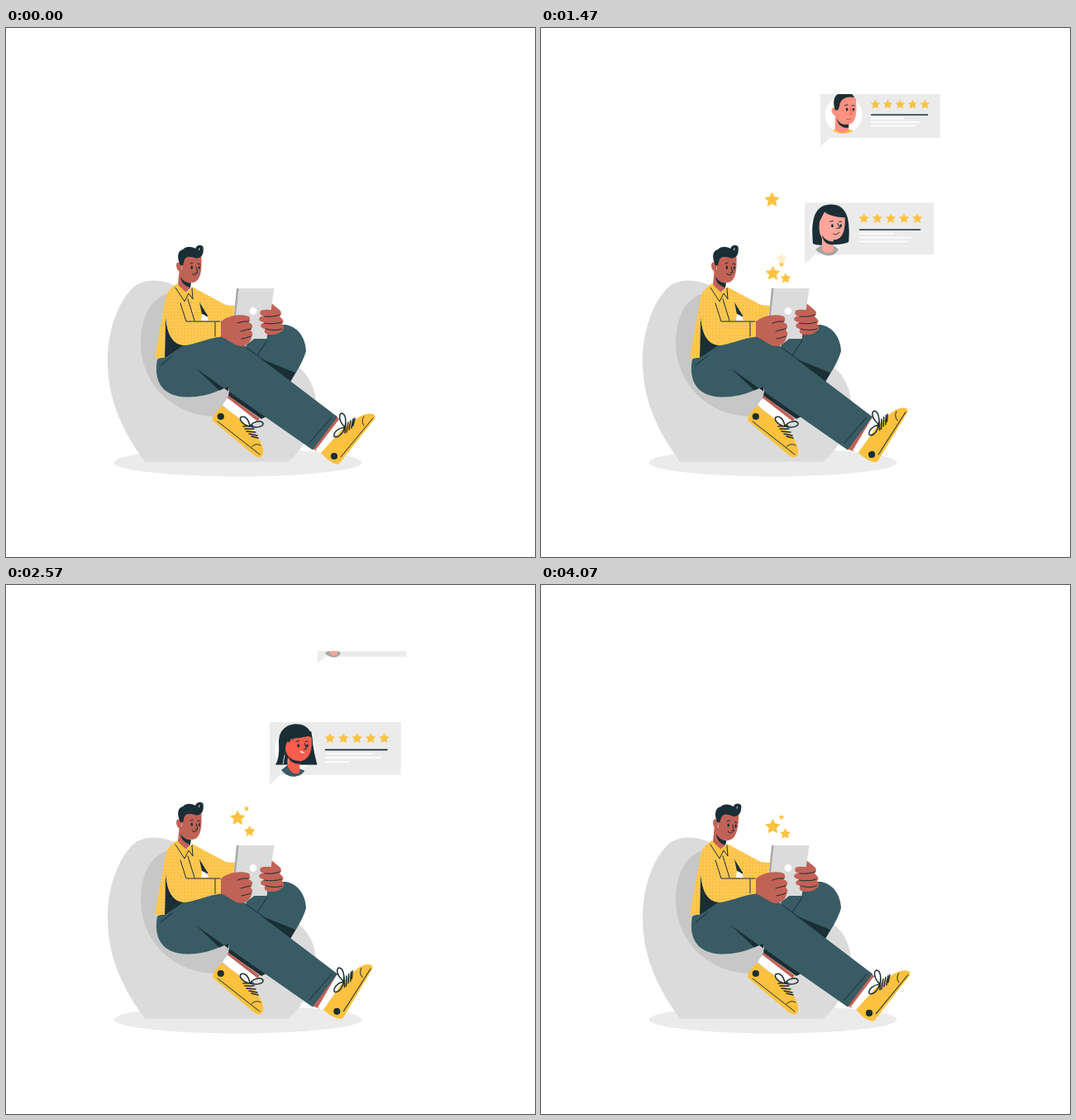
An HTML page that plays this animation: 640 px wide and 640 px high, repeating every 4130 ms.

```html
<!DOCTYPE html>
<html lang="en">
<head>
<meta charset="utf-8">
<title>Reading reviews</title>
<style>
  html, body { margin: 0; width: 100%; height: 100%; overflow: hidden; background: #fff; }
  svg { display: block; width: 100vw; height: 100vh; }
  .dark { fill: #1a2e35; }
  .teal { fill: #385b64; }
  .skin { fill: #c16256; }
  .gold { fill: #fcc13f; }
  .line { fill: none; stroke: #1a2e35; stroke-width: 1; stroke-linecap: round; stroke-linejoin: round; }
  .lace { stroke-width: 1.5; }
</style>
</head>
<body>
<svg id="stage" viewBox="0 0 640 640">
  <defs>
    <clipPath id="frame"><rect y="80" width="640" height="480"/></clipPath>
    <pattern id="check" width="4" height="4" patternUnits="userSpaceOnUse">
      <path d="M0 2H4M2 0V4" stroke="#fff" stroke-width=".6" opacity=".3"/>
    </pattern>
    <path id="farArm" d="M225 313L264 334Q268 336 277 336L275 350L258 355L243 353L224 326Z"/>
    <path id="shirt" d="M207 309C199 314 195 319 193 327L180 399L192 399L193 345C194 368 200 384 217 384C229 383 241 376 260 373.500V354.500L244 354L226 314L218 320Z"/>
  </defs>

  <ellipse cx="280.500" cy="525.700" rx="150" ry="16.800" fill="#ebebeb"/>
  <path fill="#dbdbdb" d="M168 524.700C137 482 123 445 123 402C123 362 138 327 156 312C170 303 190 304 205 312C260 340 330 382 355 411C368 422 376 440 375 458C373 490 355 514 341 524.700Z"/>
  <path fill="#c7c7c7" d="M206 319C180 322 163 342 163 382C164 432 203 470 255 470L290 440Z"/>

  <g clip-path="url(#frame)">
    <g id="cards"></g>
    <g id="stars"></g>
  </g>

  <!-- far leg -->
  <path class="teal" d="M290 384C312 366 326 358 338 359C354 361 363 377 363 391C359 405 350 418 344 428L311 468L270 436L300 410Z"/>
  <path class="dark" d="M303 398L350 417L344 428L320 412Z"/>
  <path class="line" d="M316 378L304 396"/>
  <path class="dark" d="M270 439L315 470L309 473L269 445Z"/>

  <!-- far foot -->
  <path class="skin" d="M269 444.500L307 472.500L304 476L267 449Z"/>
  <path fill="#fff" d="M268 447.500L304 475.500L296 484L262 456Z"/>
  <path class="gold" d="M261 457L282 472C290 482 300 485 308 501C313 511 312 518 307 519.500Q304 520 300 517L250 475C249 469 256 463 261 457Z"/>
  <circle class="dark" cx="259.800" cy="470" r="4.100"/>
  <path class="line" d="M256 476L307 516M297 507C300 503 305 503 308 505"/>
  <path class="line lace" d="M294 482C286 480 282 474 284 471C289 468 294 474 295 482C299 476 308 474 311 478C312 483 302 484 295 482M287 482L299 481M289 485L300 485M291 488L302 489M294 491L304 493M297 494L305 496"/>

  <!-- near foot -->
  <g id="foot">
    <path class="skin" d="M398 468L404 474L376 512L369 508Z"/>
    <path fill="#fff" d="M402.500 474L412 482L384 515L374.500 510.500Z"/>
    <path class="gold" d="M381 514L408 484C419 478 428 466 441 466.500C447 467 448 470 445 474L404 526Q402 528.500 399 527.500C391 525 386 519 381 514Z"/>
    <circle class="dark" cx="397" cy="518" r="4.100"/>
    <path class="line" d="M405 519L444 472M433 481C430 477 431 473 433 470"/>
    <path class="line lace" d="M410 483C403 476 402 468 406 466C411 467 412 475 410 483C402 484 396 489 397 494C402 497 408 490 410 483M411 478L410 490M414 477L412 489M417 475L415 486M420 473L418 484M422 472L420 481"/>
  </g>

  <!-- near leg -->
  <path class="dark" d="M192 399L193 346C194 368 200 381 217 384L235 376L210 402Z"/>
  <path class="teal" d="M183 401C186 399 189 399 192 398.500C207 392 224 371.500 250 371.500C270 372 288 384 303 396L401 470.500L371 510.500L270 440V433C254 441 238 447 218 446.500C190 446 178 428 183 401Z"/>
  <path class="dark" d="M230 412L269 439.500L270 433L258 438.500Z"/>
  <path class="line" d="M187 408L201 397M283 381L315 404M394 471L367 502"/>

  <!-- shirt -->
  <use href="#farArm" class="gold"/><use href="#farArm" fill="url(#check)"/>
  <path class="dark" d="M232 329L244 348V354L238 349Z"/>
  <path fill="#fff" d="M236 354L237 346L245 354Z"/>
  <use href="#shirt" class="gold"/><use href="#shirt" fill="url(#check)"/>
  <path class="dark" d="M234 332L244 349L237 346Z"/>
  <path fill="#fff" d="M237 346L244 349.500V354H236Z"/>
  <path class="line" d="M211 333L218 355H259M253 356V373M220 328L228 354"/>

  <!-- tablet and hands -->
  <path class="skin" d="M320 332L332 342Q334 347 331 349L334 352Q337 355 334 358L336 361Q337 366 333 367Q330 371 321 371L312 369L310 340Z"/>
  <path fill="#a6a6a6" d="M279 315H284L278 376H273Z"/>
  <path fill="#dbdbdb" d="M281.500 315H324.500L315.500 376H275Z"/>
  <circle cx="299" cy="342.500" r="4.400" fill="#fff"/>
  <path class="skin" d="M308 342Q314 339 332 343Q334 348 329 349H314Q305 348 308 342ZM307 350Q312 346 333 351Q336 356 332 358Q310 358 306 353ZM309 358Q314 354 335 360Q338 365 332 367Q312 366 308 361ZM313 365Q320 362 332 366Q328 371 319 371Q311 370 313 365Z"/>
  <path class="line" d="M313 349Q324 350 331 347M312 357Q324 359 333 356M314 364Q326 367 334 364"/>
  <path class="skin" d="M260 355C270 347 285 345.500 294 349Q297 354 293 356Q299 358 298 362L296 366Q300 369 297 374C296 381 289 385 284 385C275 384 268 376 260 373.500Z"/>
  <path class="line" d="M280 357Q287 354 294 355M284 367Q290 365 296 364M285 376Q291 375 296 373"/>

  <!-- head -->
  <path class="skin" d="M210 290L208 310L216 321L223 315L222 300Z"/>
  <g id="head">
    <path class="skin" d="M212 278C211 297 217 308 225 308C235 307 237 296 236.500 277L222 270Z"/>
    <path class="skin" d="M212 285Q206 281 206 288Q207 295 212 295Z"/>
    <path class="dark" d="M211 301C215 307 220 309 224 308L223 314C216 312 212 308 211 301Z"/>
    <path class="dark" d="M211 287C206 277 208 269 214 268C218 263 227 265 229 267C231 262 236 262 238.500 264.500C240 274 236 279 230 278.500C224 277 219 275 216 280L214 287Z"/>
    <path d="M234 266L233.500 269" stroke="#fff" stroke-width=".8"/>
    <ellipse class="dark" cx="224.800" cy="289.700" rx="1.200" ry="2.200"/>
    <ellipse class="dark" cx="233.800" cy="290" rx="1.100" ry="2.100"/>
    <path class="line" d="M223 285L226 284M232 285L235 286M230 289L232 296H229M225 297Q227 300 230 298" stroke-width="1.200"/>
  </g>
  <path class="gold" d="M207 310L217 331L221 319L226 328L225 314L218 320Z"/>
  <path class="line" d="M205 314L216 331L221 321L226 328L225 315"/>
</svg>
<script>
const LOOP = 4130;
const $ = id => document.getElementById(id);

// Smooth curve through [time, value, time, value, ...] without overshoot.
function curve(keys, t) {
  const n = keys.length / 2, T = i => keys[2 * i], V = i => keys[2 * i + 1];
  if (t <= T(0)) return V(0);
  if (t >= T(n - 1)) return V(n - 1);
  let i = 0;
  while (t > T(i + 1)) i++;
  const rate = k => (V(k + 1) - V(k)) / (T(k + 1) - T(k));
  const slope = k => {
    if (k === 0) return rate(0);
    if (k === n - 1) return rate(n - 2);
    const a = rate(k - 1), b = rate(k);
    return a * b > 0 ? 2 * a * b / (a + b) : 0;
  };
  const span = T(i + 1) - T(i), u = (t - T(i)) / span, w = 1 - u;
  return V(i) * (1 + 2 * u) * w * w + slope(i) * span * u * w * w
    + V(i + 1) * u * u * (3 - 2 * u) - slope(i + 1) * span * u * u * w;
}
const smooth = (a, b, t) => {
  const u = Math.min(1, Math.max(0, (t - a) / (b - a)));
  return u * u * (3 - 2 * u);
};

function starPath(x, y, r) {
  const points = Array.from({ length: 10 }, (_, i) => {
    const a = Math.PI * (i / 5 - .5), d = i % 2 ? r * .5 : r;
    return `${(x + d * Math.cos(a)).toFixed(2)} ${(y + d * Math.sin(a)).toFixed(2)}`;
  });
  return `<path class="gold" d="M${points.join('L')}Z" stroke="#fcc13f" stroke-width="${r * .08}" stroke-linejoin="round"/>`;
}

const face = (x1, x2, y) => `
  <ellipse class="dark" cx="${x1}" cy="${y}" rx="1.400" ry="2.100"/>
  <ellipse class="dark" cx="${x2}" cy="${y}" rx="1.300" ry="2"/>
  <path class="line" d="M${x1 - 3} ${y - 5}L${x1 + 1} ${y - 6}M${x2 - 2} ${y - 5}L${x2 + 1} ${y - 5}"/>`;

const man = `
  <g transform="scale(1.047) translate(-315.500 -311)">
    <path class="gold" d="M331 291L335 287L352 289L357 291Q345 298 331 291Z"/>
    <path fill="#ff9181" d="M334 268V289Q342 297 351 291V283C360 281 362 270 360 250L345 245Z"/>
    <path fill="#ff9181" d="M336 263Q329 259 329.500 266Q331 272 336 272Z"/>
    <path class="dark" d="M336 275C339 282 345 284 351 282.500V287C343 288 337 283 336 275Z"/>
    <path class="dark" d="M334 265C329 250 335 242 347 242.500C353 243 357 245 358 249C349 247 342 250 340 257Q339 263 337 265Z"/>
    ${face(348.8, 357, 264)}
    <path d="M353 262L355 270H352M348 276Q351 278 354 275" fill="none" stroke="#e0483c"/>
  </g>`;

const bobWoman = `
  <g transform="translate(-319 -286)">
    <path class="dark" d="M329 261C327 240 327 213 351 213C371 213 375 232 372.500 259Q366 262 357 262H344Q336 264 329 261Z"/>
    <path fill="#a6a6a6" d="M332 268L340 262L356 264L360 268C355 278 343 278 332 268Z"/>
    <path fill="#ffa59b" d="M340 254V268Q346 275 354 270V256C364 257 369 246 368 229Q350 228 343 222L337 234C336 245 337 249 340 254Z"/>
    <path class="dark" d="M340 250C344 257 350 259 355 258V262C346 263 341 258 340 250Z"/>
    ${face(352.6, 363, 239)}
    <path class="line" d="M359 236L362 242H358M354 249Q358 251 361 247"/>
  </g>`;

const longHairWoman = `
  <g transform="translate(-319 -242)">
    <path class="dark" d="M326 218Q331 209 330 193C329 174 342 169 351 169C367 169 371 182 371 194Q373 207 376 218Z"/>
    <path fill="#385b64" d="M333 224L341 218L354 222L361 225C355 234 341 235 333 224Z"/>
    <path fill="#fb5d4c" d="M341 207V221Q348 232 355 227V214C367 212 371 201 369 183L343 187C336 193 337 202 341 207Z"/>
    <path class="dark" d="M340 206Q346 214 355 213V217Q343 217 340 206ZM339 189L341 178H369L370 186Q366 182 362 184Q354 187 348 185L347 189L345 185L343 191Z"/>
    <path d="M335 217L337 206M341 217V211" stroke="#fff" stroke-width=".8"/>
    ${face(353.5, 364, 195)}
    <path class="line" d="M361 192L363 199H360"/>
    <path d="M355 201Q357 205 361 203Z" fill="#fff"/>
  </g>`;

function cardMarkup(person, lines) {
  const rating = [0, 1, 2, 3, 4].map(i => starPath(72.3 + 16.3 * i, -55.7, 6)).join('');
  const text = lines.map((w, i) => `<path d="M66.500 ${-37.5 + 4.9 * i}h${w}" stroke="#fff" stroke-width="1.700"/>`).join('');
  return `<g><path fill="#ebebeb" d="M0-75.300H157.500V-12H12.500L0 0Z"/>
    <circle cx="30.500" cy="-42.500" r="24.600" fill="#fff"/>${person}${rating}
    <path d="M66.500-42.200h75" stroke="#1a2e35" stroke-width="1.700"/>${text}</g>`;
}

// Each card follows the common path, bent by its own sway and lift.
const level = [0, 0, 1, 0];
const cards = [
  { start: 0, sway: level, lift: level, art: cardMarkup(man, [43, 64, 59]) },
  { start: 810, sway: [400, 0, 660, 3, 1260, 11.5, 1760, 12], lift: [400, 0, 660, -11.5, 1260, -11, 1760, -6], art: cardMarkup(bobWoman, [43, 64, 59]) },
  { start: 1610, sway: level, lift: level, art: cardMarkup(longHairWoman, [57, 67, 29]) }
];
const cardPath = {
  x: [0, 311, 460, 313.5, 600, 315.5, 960, 319, 1070, 322, 1470, 338, 1760, 365, 2050, 396],
  y: [0, 320, 460, 317, 600, 311, 660, 297.5, 960, 242, 1070, 221, 1470, 144, 1760, 101, 2050, 65],
  size: [0, 0, 460, .823, 600, .957, 700, 1, 1000, 1.008, 1230, 1, 1470, .92, 1760, .682, 2050, .4]
};

// Stars sink towards the tablet; times are counted from the start of a burst.
const starKinds = [
  { r: 9, x: [0, 279.4, 1470, 280.5, 2030, 284], y: [0, 206, 120, 208, 600, 231, 720, 242, 1220, 282, 1370, 292.5, 1470, 297, 2030, 311],
    size: [1450, 1, 2040, .08, 2060, 0], fade: [0, 0, 100, 1] },
  { r: 6.6, x: [120, 291, 720, 292.5, 1470, 296, 1950, 298], y: [0, 278, 120, 279, 600, 283.5, 720, 286.5, 1220, 298, 1470, 303, 1950, 310],
    size: [0, .85, 400, 1, 1220, 1, 1470, .94, 1950, 0], fade: [50, 0, 300, 1] },
  { r: 4.2, x: [600, 276.2, 720, 277, 1150, 279], y: [250, 246, 600, 256, 720, 262, 1150, 283],
    size: [720, 1, 1150, 0], fade: [200, 0, 450, 1] },
  { r: 3.2, x: [0, 291, 1, 291], y: [200, 225, 600, 238, 720, 244, 1220, 270.5, 1370, 281, 1470, 286, 2020, 312, 2120, 315],
    size: [1470, 1, 2070, .75, 2150, 0], fade: [200, 0, 420, 1] }
];
const bursts = [0, 1350, 2700];

$('cards').innerHTML = cards.map(c => c.art).join('');
$('stars').innerHTML = bursts.map(() => starKinds.map(s => `<g>${starPath(0, 0, s.r)}</g>`).join('')).join('');

function place(node, shown, x, y, size) {
  node.style.display = shown && size > 0 ? '' : 'none';
  node.setAttribute('transform', `translate(${x.toFixed(2)} ${y.toFixed(2)}) scale(${size.toFixed(4)})`);
}

function draw(t) {
  cards.forEach((card, i) => {
    const age = t - card.start;
    place($('cards').children[i], age > 0 && age < 2050,
      curve(cardPath.x, age) + curve(card.sway, age),
      curve(cardPath.y, age) + curve(card.lift, age),
      curve(cardPath.size, age));
  });

  bursts.forEach((start, b) => starKinds.forEach((star, k) => {
    const age = t - start, node = $('stars').children[b * starKinds.length + k];
    place(node, age > 0, curve(star.x, age), curve(star.y, age), curve(star.size, age));
    node.setAttribute('opacity', curve(star.fade, age).toFixed(3));
  }));

  const tap = (1 - Math.cos(t / LOOP * 8 * Math.PI)) / 2;
  $('foot').setAttribute('transform', `rotate(${-7.4 * tap} 382 491)`);

  const nodTime = t % 3200;
  const nod = smooth(0, 600, nodTime) - smooth(1000, 1480, nodTime);
  $('head').setAttribute('transform', `rotate(${4.3 * nod} 213 315)`);
}

function tick() {
  const t = performance.now() % LOOP;
  draw(t < 30 ? 0 : Math.min(t, 4070));
  requestAnimationFrame(tick);
}
tick();
</script>
</body>
</html>
```
